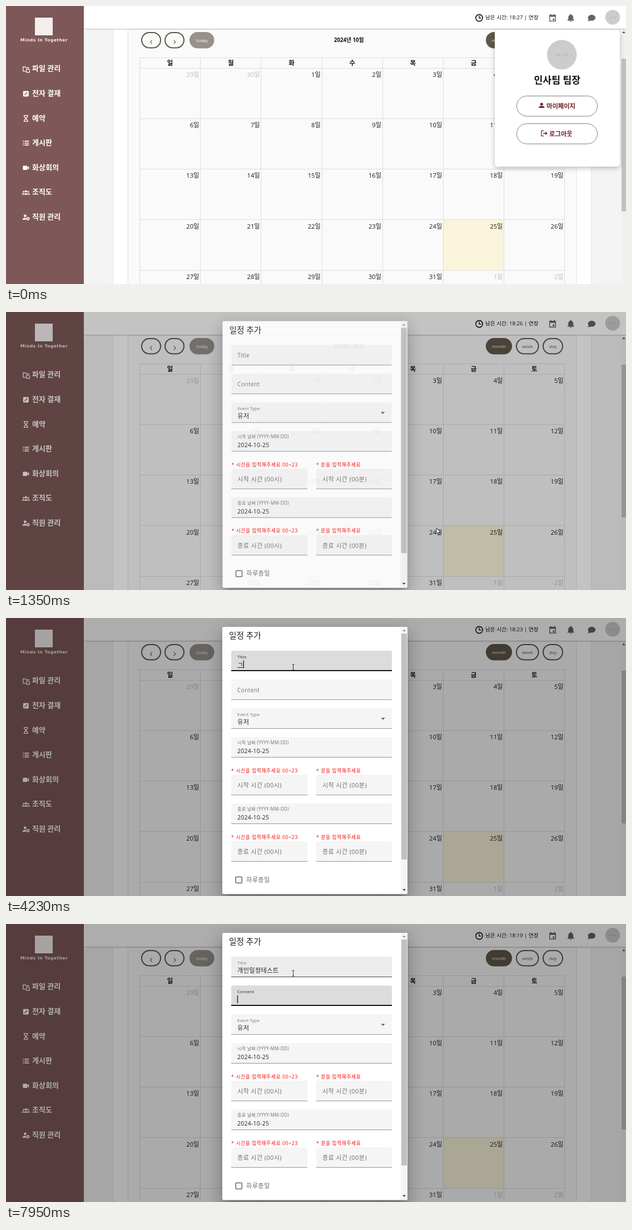
Recreate the animation shown at these times as an HTML page. Size 1115 by 502 pixels, loop 8000 ms.

```html
<!DOCTYPE html>
<html lang="ko">
<head>
<meta charset="utf-8">
<title>일정 추가</title>
<style>
  html, body { margin: 0; width: 100%; height: 100%; overflow: hidden; background: #fff; }
  svg { display: block; width: 100vw; height: 100vh; }
  text { font-family: "Open Sans", "Noto Sans CJK KR", "Noto Sans CJK", sans-serif; white-space: pre; }
</style>
</head>
<body>
<svg id="stage" viewBox="0 0 1115 502" xmlns="http://www.w3.org/2000/svg"></svg>
<script>
const LOOP = 8000;
const stage = document.getElementById('stage');

// ---------- markup helpers ----------
const attrs = o => Object.entries(o).map(([k, v]) => ` ${k}="${v}"`).join('');
const rect = (x, y, w, h, fill, o = {}) =>
  `<rect x="${x}" y="${y}" width="${w}" height="${h}" fill="${fill}"${attrs(o)}/>`;
const circle = (cx, cy, r, fill, o = {}) =>
  `<circle cx="${cx}" cy="${cy}" r="${r}" fill="${fill}"${attrs(o)}/>`;
const path = (d, fill, o = {}) => `<path d="${d}" fill="${fill}"${attrs(o)}/>`;
const line = (d, stroke, width = 1, o = {}) =>
  path(d, 'none', { stroke, 'stroke-width': width, ...o });
const at = (x, y, body) => `<g transform="translate(${x} ${y})">${body}</g>`;
// y is the vertical middle of the glyphs
const text = (x, y, str, size, fill, o = {}) =>
  `<text x="${x}" y="${(y + size * 0.36).toFixed(2)}" font-size="${size}" fill="${fill}"${attrs(o)}>${str}</text>`;

const MID = { 'text-anchor': 'middle' };
const END = { 'text-anchor': 'end' };
const BOLD = { 'font-weight': 700 };
const spaced = n => ({ 'letter-spacing': n });

// ---------- sidebar ----------
const menu = [
  ['파일 관리', line('M-5 4V-4H-1L0-2.5H5V-1M-5 4H0', '#fff', 1.3) +
    path('M1 0H4.5L6.5 2V6H1Z', 'none', { stroke: '#fff', 'stroke-width': 1.2 })],
  ['전자 결재', rect(-5, -5, 10, 10, '#fff', { rx: 1.4 }) + line('M-2.4 2.4L2.4-2.4', '#7e5858', 1.6)],
  ['예약', line('M-4-5.3H4M-4 5.3H4M-2.8-5V-3L0 0L2.8-3V-5M-2.8 5V3L0 0L2.8 3V5', '#fff', 1.3)],
  ['게시판', line('M-5.5-3.5H-4M-5.5 0H-4M-5.5 3.5H-4M-2.5-3.5H5.5M-2.5 0H5.5M-2.5 3.5H5.5', '#fff', 1.6)],
  ['화상회의', rect(-5.5, -3.8, 8, 7.6, '#fff', { rx: 1 }) + path('M2.5-.8L5.5-3.3V3.3L2.5 .8Z', '#fff')],
  ['조직도', circle(0, -2, 2, '#fff') + circle(-4, -1.2, 1.5, '#fff') + circle(4, -1.2, 1.5, '#fff') +
    path('M-3.4 4V2.8Q0-.4 3.4 2.8V4ZM-7 4V2.6Q-5.5 .6-3.8 1.4L-4.4 4ZM7 4V2.6Q5.5 .6 3.8 1.4L4.4 4Z', '#fff')],
  ['직원 관리', circle(-1.5, -2.6, 2.4, '#fff') + path('M-6 4.6V3Q-4 .4 0 1.2Q-.6 3 .4 4.6Z', '#fff') +
    circle(3.6, 2.6, 1.9, 'none', { stroke: '#fff', 'stroke-width': 1.5 }) +
    circle(3.6, 2.6, 2.9, 'none', { stroke: '#fff', 'stroke-width': 1, 'stroke-dasharray': '1.5 1.54' })],
];
const sidebar = rect(0, 0, 140, 502, '#7e5858') +
  rect(52, 21, 32, 32, '#f5eeee') +
  text(68.5, 61, 'Minds In Together', 7.6, '#f5eeee',
    { ...MID, ...BOLD, ...spaced(0.5), style: "font-family:'DejaVu Sans',sans-serif" }) +
  menu.map(([label, icon], i) => {
    const y = 112.8 + i * 44.6;
    return at(35.8, y + 1, icon) + text(47, y, label, 13, '#fff', BOLD);
  }).join('');

// ---------- calendar ----------
const COL = 109.2, ROW = 91.2, LEFT = 240.5, TOP = 112.3;
const BROWN = '#5f574a';

function calendar() {
  let out = rect(140, 42, 975, 460, '#f4f4f4') + path('M140 42H149Q141 43 140 51Z', '#fff') +
    rect(193, 42, 860, 460, '#fff') + line('M192.5 42V502M1052.5 42V502', '#e8e8e8') +
    rect(220, 42, 805, 460, '#fafafa', { filter: 'url(#soft)' });

  out += rect(LEFT + COL * 5, TOP + ROW * 3, COL, ROW, '#faf5da');
  let grid = 'M240.5 93.5H1004.5';
  for (let c = 0; c <= 7; c++) grid += `M${Math.round(LEFT + COL * c - 0.5) + 0.5} 93V502`;
  for (let r = 0; r < 5; r++) grid += `M240 ${Math.floor(TOP + ROW * r) + 0.5}H1005`;
  out += line(grid, '#ddd');

  [...'일월화수목금토'].forEach((d, c) => {
    out += text(LEFT + COL * (c + 0.5), 102.6, d, 11.5, '#111', { ...MID, ...BOLD });
  });
  for (let i = 0; i < 35; i++) {
    const n = i - 1;
    const other = n < 1 || n > 31;
    const day = n < 1 ? n + 30 : n > 31 ? n - 31 : n;
    out += text(LEFT + COL * (i % 7 + 1) - 2.3, 124 + ROW * Math.floor(i / 7), day + '일', 11.2,
      other ? '#bdbdbd' : '#1c1c1c', END);
  }

  const pill = (x, w, fill, label, ink) =>
    rect(x + 1, 48, w - 2, 27.5, fill, { rx: 13.7, stroke: fill === 'none' ? BROWN : fill, 'stroke-width': 2 }) +
    text(x + w / 2, 62, label, 8, ink, MID);
  out += pill(243, 36, 'none', '', BROWN) + pill(285, 36, 'none', '', BROWN) +
    line('M262.6 61.5L259.6 65L262.6 68.5M301.8 61.5L304.8 65L301.8 68.5', '#444', 1.1) +
    pill(330, 44.5, '#98918a', 'today', '#fff') +
    pill(863, 47, BROWN, 'month', '#fff') +
    pill(917, 41.5, 'none', 'week', BROWN) + pill(965, 37, 'none', 'day', BROWN) +
    text(616.7, 61.5, '2024년 10월', 9.7, '#111', { ...MID, ...BOLD });

  return out + rect(1107, 42, 8, 460, '#f1f1f1') + rect(1107, 95, 8, 276, '#c1c1c1') +
    path('M1108.3 49L1111 45.5L1113.7 49Z', '#505050');
}

// ---------- top bar and profile card ----------
const ICON = '#636363';
const header = rect(140, 0, 975, 41, '#fff', { filter: 'url(#soft)' }) +
  circle(851, 21.5, 6.1, 'none', { stroke: '#111', 'stroke-width': 1.6 }) +
  line('M851 17.5V21.8H854.5', '#111', 1.4) +
  '<text id="clock" x="862" y="24.4" font-size="9.65" fill="#111"></text>' +
  at(983, 21.5, path('M-6-5.5H6V6.5H-6ZM-4.6-2V5.1H4.6V-2Z', ICON, { 'fill-rule': 'evenodd' }) +
    rect(-4, -7, 1.6, 2.5, ICON) + rect(2.4, -7, 1.6, 2.5, ICON) + rect(0.3, 1, 3, 3, ICON)) +
  at(1015.7, 21.5, path('M-6 5V4L-4.5 2.5V-1Q-4.3-4.8-1-5.6V-6.2A1 1 0 0 1 1-6.2V-5.6Q4.3-4.8 4.5-1V2.5L6 4V5ZM-1.5 5.8H1.5Q1.2 7.3 0 7.3T-1.5 5.8Z', ICON)) +
  at(1053, 21.5, `<ellipse cx="0.3" cy="-.3" rx="6.8" ry="5.4" fill="${ICON}"/>` +
    path('M-5 1Q-5 4.5-7 5.8Q-3.5 6-1.5 4.5Z', ICON)) +
  circle(1091, 20.3, 13.3, '#ccc') + text(1091, 20.5, '150 x 150', 2.8, '#a2a2a2', MID);

const WINE = '#6e1f24';
const cardButton = (y, x, label, icon) =>
  rect(918.5, y + 0.5, 145, 36.5, '#fff', { rx: 18.2, stroke: '#7d7d7d' }) +
  text(x, y + 19, label, 11.3, WINE, BOLD) + icon;
const card = '<g id="card">' +
  rect(879, 43, 225, 247, '#fff', { rx: 6, filter: 'url(#lift)' }) +
  circle(999.7, 88, 26.7, '#ccc') + text(999.7, 88.5, '150 x 150', 5, '#a0a0a0', MID) +
  text(991.3, 134, '인사팀 팀장', 17.2, '#111', { ...MID, ...BOLD }) +
  cardButton(162, 972, '마이페이지', at(963.3, 180, circle(0, -2.8, 2.5, WINE) + path('M-5 4V2.8Q-4 .4 0 .4T5 2.8V4Z', WINE))) +
  cardButton(212, 977, '로그아웃', at(967.5, 230, line('M-.5-4.6H-4.6V4.6H-.5M-1.5 0H5M2.6-2.6L5.2 0L2.6 2.6', WINE, 1.3))) +
  '</g>';

// ---------- dialog ----------
const GREY = '#707070';
const WIDE = spaced(0.35);
const shadow = (dy, blur, spread, opacity) =>
  rect(389 - spread, 16 + dy - spread, 333 + 2 * spread, 482.5 + 2 * spread, '#000',
    { rx: 3, opacity, style: `filter:blur(${blur}px)` });
const field = (x, y, w, id = '') =>
  `<path${id && ` id="${id}Box"`} d="M${x} ${y + 37}V${y + 3}q0-3 3-3H${x + w - 3}q3 0 3 3V${y + 37}Z" fill="#f5f5f5"/>` +
  `<path${id && ` id="${id}Line"`} d="M${x} ${y + 36.5}H${x + w}" stroke="#949494"/>` +
  (id && `<path id="${id}Bar" stroke="#111" stroke-width="2"/>`);
const dateField = (y, label) => field(405, y, 289) +
  text(416, y + 10.5, `${label} 날짜 (YYYY-MM-DD)`, 8.1, GREY, spaced(0.22)) +
  text(416, y + 25.6, '2024-10-25', 10.4, '#222', spaced(0.3));
const timeFields = (y, label) =>
  [[405, '시간을 입력해주세요 00~23', '시'], [558, '분을 입력해주세요', '분']].map(([x, hint, unit], i) =>
    text(x, y - 7.5, '* ' + hint, 8.6, '#f00', spaced(0.72)) + field(x, y, i ? 136 : 137) +
    text(x + 11, y + 19, `${label} 시간 (00${unit})`, 11.1, GREY, WIDE)).join('');

const dialog = '<g id="dialog">' +
  shadow(8, 5, -5, 0.2) + shadow(17, 13, 2, 0.14) + shadow(6, 16, 6, 0.12) +
  rect(389, 16, 333, 482.5, '#fff', { rx: 3 }) +
  text(401, 32, '일정 추가', 14.7, '#222') +
  field(405, 59, 289, 'title') + field(405, 111, 289, 'content') +
  '<text id="titleLabel" x="416" letter-spacing=".3">Title</text>' +
  '<text id="contentLabel" x="416" letter-spacing=".3">Content</text>' +
  '<text id="value" x="416" y="88" letter-spacing=".35" fill="#222"></text>' +
  '<path id="compose" stroke="#222" stroke-width="1"/>' +
  '<rect id="caret" width="1.3" height="14" fill="#111"/>' +
  field(405, 163, 289) + text(416, 174, 'Event Type', 7.5, GREY, spaced(0.22)) +
  text(416, 188, '유저', 11.2, '#222', WIDE) + path('M674.3 180.3H681.7L678 184Z', '#666') +
  dateField(215, '시작') + timeFields(283, '시작') +
  dateField(335, '종료') + timeFields(403, '종료') +
  rect(413.2, 467.5, 11, 11, 'none', { rx: 1, stroke: '#666', 'stroke-width': 1.5 }) +
  text(432, 473, '하루종일', 11.2, '#666', WIDE) +
  rect(710, 16, 12, 482, '#f5f5f5') + rect(711, 28, 10, 408, '#c1c1c1') +
  path('M713 24L716 20.5L719 24Z', '#999') + path('M713 489.5L716 493L719 489.5Z', '#444') +
  '</g>';

stage.innerHTML = `<defs>
  <filter id="soft" x="-5%" y="-20%" width="110%" height="150%"><feDropShadow dx="0" dy="0.8" stdDeviation="1.2" flood-opacity=".32"/></filter>
  <filter id="lift" x="-10%" y="-10%" width="120%" height="120%"><feDropShadow dx="0" dy="3" stdDeviation="4" flood-opacity=".24"/></filter>
  </defs>` + calendar() + header + card + sidebar +
  rect(0, 0, 1115, 502, '#000', { id: 'shade' }) + dialog +
  `<g id="arrow">${path('M0 0V10L2.3 7.9L3.9 11.4L5.5 10.7L3.9 7.3H7Z', '#fff', { stroke: '#222', 'stroke-width': 0.9 })}</g>` +
  `<g id="beam">${line('M-2-5H2M0-5V5M-2 5H2', '#333')}</g>`;

const el = {};
stage.querySelectorAll('[id]').forEach(n => { el[n.id] = n; });
const set = (id, o) => { for (const k in o) el[id].setAttribute(k, o[k]); };

// ---------- timing ----------
const clamp = v => Math.max(0, Math.min(1, v));
const span = (t, start, length) => clamp((t - start) / length);
const mix = (a, b, p) => a + (b - a) * p;
const grey = v => `rgb(${[v, v, v].map(Math.round)})`;

function bezier(x1, y1, x2, y2, p) {
  const curve = (a, b, s) => 3 * (1 - s) * (1 - s) * s * a + 3 * (1 - s) * s * s * b + s * s * s;
  let lo = 0, hi = 1;
  for (let i = 0; i < 20; i++) {
    const s = (lo + hi) / 2;
    if (curve(x1, x2, s) < p) lo = s; else hi = s;
  }
  return curve(y1, y2, hi);
}
const standard = p => bezier(0.4, 0, 0.2, 1, p);

const HIDE_CARD = 1120, OPEN = 1190, DIM = 1266, HOVER = 1920, FOCUS = 2180, NEXT = 7670, BLINK = 530;

const typing = [
  [FOCUS, ''], [2700, 'r'], [2830, 'ro'], [2970, 'rod'], [3030, 'rodl'], [3170, 'rodls'],
  [3370, 'rodl'], [3450, 'rod'], [3530, 'ro'], [3610, 'r'], [3700, ''],
  [4230, 'ㄱ'], [4310, '개'], [4400, '갱'], [4630, '개이'], [5020, '개인'],
  [5160, '개인ㅇ'], [5250, '개인이'], [5350, '개인일'], [5640, '개인일ㅈ'], [5720, '개인일저'], [5820, '개인일정'],
  [6810, '개인일정ㅌ'], [6900, '개인일정테'], [7000, '개인일정텟'], [7100, '개인일정테스'],
  [7220, '개인일정테슽'], [7330, '개인일정테스트'],
];

const track = [
  [120, 945, 502], [400, 872, 468], [650, 800, 428], [870, 836, 414], [950, 838, 413],
  [1280, 838, 413], [1350, 775, 391], [1500, 650, 270], [1700, 532, 112], [1880, 518, 93], [2020, 516.5, 89],
];
function pointer(t) {
  const i = track.findIndex(k => k[0] > t);
  if (i === 0) return null;
  if (i < 0) return track[track.length - 1].slice(1);
  const [a, b] = [track[i - 1], track[i]];
  const p = span(t, a[0], b[0] - a[0]);
  return [mix(a[1], b[1], p), mix(a[2], b[2], p)];
}

function drawPointer(t) {
  const pos = pointer(t);
  const inField = pos && t > 1500 && pos[0] > 405 && pos[0] < 694 &&
    [59, 111, 215, 283, 335].some(y => pos[1] >= y && pos[1] <= y + 37);
  set('arrow', { visibility: pos && !inField ? 'visible' : 'hidden' });
  set('beam', { visibility: inField ? 'visible' : 'hidden' });
  if (pos) set(inField ? 'beam' : 'arrow', { transform: `translate(${pos})` });
}

// lift: label position 0..1, glow: focus strength 0..1
function drawField(id, top, { lift, glow, base, bar, lineInk }) {
  const size = mix(10.2, 7.6, lift);
  set(id + 'Box', { fill: grey(mix(base, 220, glow)) });
  set(id + 'Line', { stroke: lineInk });
  set(id + 'Bar', {
    d: `M${549.5 - 144.5 * bar.width} ${top + 36}H${549.5 + 144.5 * bar.width}`, opacity: bar.opacity,
  });
  set(id + 'Label', {
    y: top + mix(19.3, 11.2, lift) + size * 0.36, 'font-size': size, fill: grey(mix(112, 34, glow)),
  });
}

function drawForm(t) {
  const focus = standard(span(t, FOCUS, 170)), blur = standard(span(t, NEXT, 170));
  const hover = span(t, HOVER, 60);
  drawField('title', 59, {
    lift: focus, glow: focus * (1 - blur), base: mix(245, 236, hover),
    bar: { width: focus, opacity: t < FOCUS ? 0 : 1 - blur }, lineInk: grey(mix(148, 70, hover)),
  });
  drawField('content', 111, {
    lift: blur, glow: blur, base: 245,
    bar: { width: blur, opacity: t < NEXT ? 0 : 1 }, lineInk: '#949494',
  });

  const step = typing.filter(k => k[0] <= t).pop();
  const str = step ? step[1] : '';
  el.value.textContent = str;
  set('value', { 'font-size': /[a-z]/.test(str) ? 10.2 : 11.2 });
  const end = 416 + (str ? el.value.getComputedTextLength() : 0);
  const composing = /[ㄱ-힣]$/.test(str) && t < NEXT;
  set('compose', { d: composing ? `M${end - 10.4} 89.5H${end - 0.3}` : '' });

  const moved = t >= NEXT;
  const since = t - (moved ? NEXT : step ? step[0] : 0);
  const lit = step && Math.floor(since / BLINK) % 2 === 0;
  set('caret', { x: moved ? 415.8 : end, y: moved ? 129 : 76.5, visibility: lit ? 'inherit' : 'hidden' });
}

function draw(t) {
  el.clock.textContent = `남은 시간: 18:${27 - Math.floor((t + 450) / 1000)} | 연장`;
  set('card', { visibility: t < HIDE_CARD ? 'visible' : 'hidden' });
  set('shade', { opacity: 0.32 * bezier(0.25, 0.8, 0.25, 1, span(t, DIM, 320)) });

  const open = span(t, OPEN, 190);
  const scale = mix(0.8, 1, bezier(0, 0, 0.2, 1, open));
  set('dialog', {
    visibility: open > 0 ? 'visible' : 'hidden',
    opacity: Math.sqrt(open),
    transform: open < 1 ? `translate(555.5 257.2) scale(${scale}) translate(-555.5 -257.2)` : '',
  });
  drawForm(t);
  drawPointer(t);
}

const begin = performance.now();
function tick() {
  draw((performance.now() - begin) % LOOP);
  requestAnimationFrame(tick);
}
tick();
</script>
</body>
</html>
```
